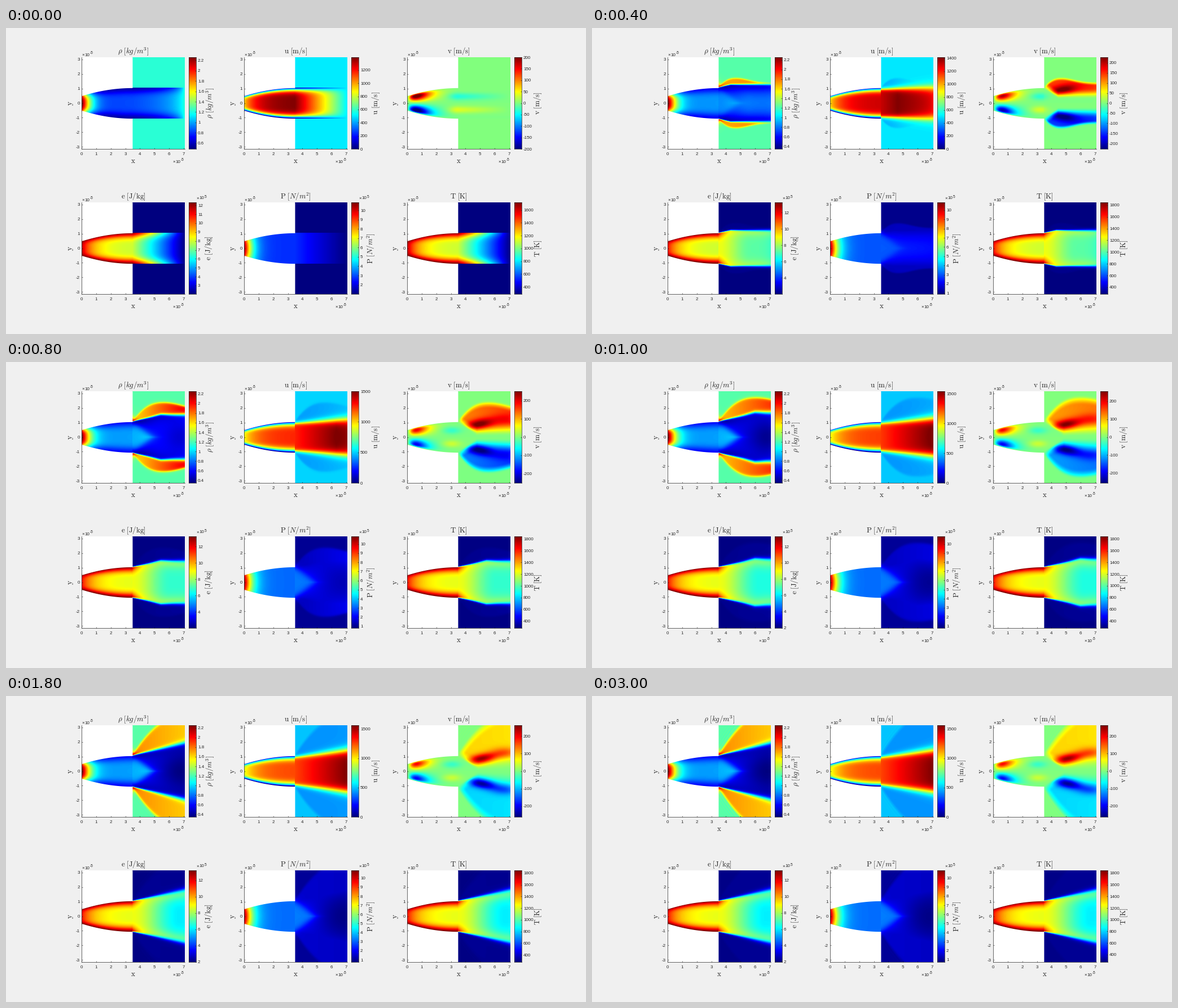
These frames come from a looping animation (1028x544 px, 3200 ms). A matplotlib script:

```python
import numpy as np
import matplotlib.pyplot as plt
from matplotlib.animation import FuncAnimation
from matplotlib.colors import ListedColormap

W, H, DPI = 1028, 544, 64
INK = "#262626"
plt.rcParams["font.family"] = "Liberation Sans"
plt.rcParams["mathtext.fontset"] = "cm"
plt.rcParams["axes.unicode_minus"] = False

ramp = np.linspace(0, 1, 256)
JET = ListedColormap(np.clip(1.5 - abs(4 * ramp[:, None] - [3, 2, 1]), 0, 1))

# Lengths in 1e-5 m, pressure in 1e5 Pa
XMAX, YMAX, EXIT, LIP = 7.08, 3.15, 3.48, 1.05
T_AIR, U_AIR, RHO_AIR, R = 288.0, 500.0, 1.225, 287e-5
P_AIR = RHO_AIR * R * T_AIR
NX, NY = 183, 163
X, Y = np.meshgrid((np.arange(NX) + 0.5) / NX * XMAX,
                   ((np.arange(NY) + 0.5) / NY * 2 - 1) * YMAX)
A = abs(Y)                          # distance from the axis
D = np.clip(X - EXIT, 0, None)      # distance behind the nozzle
FAR = D / (XMAX - EXIT)
PLUME = X > EXIT


# ---------------------------------------------------------------- helpers
def wall(x):
    return 0.5 + 0.55 * (1 - (1 - np.minimum(x, EXIT) / EXIT) ** 2)


def sigmoid(z):
    return 1 / (1 + np.exp(-np.clip(z, -40, 40)))


def smoothstep(z):
    z = np.clip(z, 0, 1)
    return z * z * (3 - 2 * z)


def gauss(dx, dy=0):
    return np.exp(-dx ** 2 - dy ** 2)


def rim(s):
    """0 on the axis, 1 at the hot edge."""
    return 1 - (1 - s ** 4) ** 1.5


SOLID = ~PLUME & (A > wall(X) + 0.08)


# ---------------------------------------------------------------- flow
def nozzle(k):
    settle = min(k / 3, 1)
    x = np.minimum(X, EXIT)
    s = np.minimum(A / wall(x), 1)

    t_end = 1105 + 110 * settle
    t = t_end + (1640 - t_end) * np.exp(-x / 0.85)
    t = t + (1847 - 135 * np.exp(-3 * k) - t) * rim(s)

    p_end = 2.68 + 0.42 * settle
    p = p_end + (10.8 - p_end) * np.exp(-((x + 0.1 * s ** 2) / 0.58) ** 1.2)

    u_end = 1400 - 135 * settle
    u = (u_end - (u_end - 930) * np.exp(-x / 0.9)) * (1 - s ** 5)

    q = x / 0.65
    v = (222 - 27 * settle) * (q * np.exp(1 - q)) ** (1.6 + 0.4 * settle)
    v = v * s ** 1.2 * (1 - s ** 5) / 0.54 - dip(x, settle)
    return t, p, u, v


def dip(x, settle):
    """Weak inward flow near the nozzle exit."""
    return 39 * gauss((x - EXIT + 0.43 * settle) / 0.65, (A - 0.46) / 0.25)


def start_plume(fields):
    """Exit profile blended linearly into still surroundings."""
    air = (T_AIR, P_AIR, U_AIR, 0)
    return [np.where(A < LIP, a + (b - a) * FAR, b)
            for a, b in zip(fields, air)]


def front_height(k):
    """Edge of the expanding pressure wave: an arc that grows steadily."""
    n = min(k, 11) - 1
    q = D / (0.75 + 0.45 * n)
    rise = 1 - np.clip(1 - q, 0, 1) ** 2.4
    fall = 0.5 + 0.5 * gauss(q - 1)
    return LIP + (0.33 + 0.33 * n) * np.where(q < 1, rise, fall)


def plume(k):
    n = k - 1
    a = min(n / 6, 1)                        # progress to the steady jet
    surge = 0.55 * gauss((k - 4) / 1.6) - 0.12 * a
    head = sigmoid((3.1 + 1.5 * n - D) / 0.4)

    # compressed air behind the front, with faint ripples ahead of it
    front = front_height(k)
    d = A - front
    shock = sigmoid(-d / (0.025 + 0.045 * a))
    waves = 0.1 * np.clip((k - 5) / 10, 0, 1)
    shock = shock + np.where(
        d > 0, waves * np.sin(2 * np.pi * d / 0.28) * np.exp(-d / 0.6), 0)
    rho_out = 1.72 + surge * (FAR - 0.3)
    t_out = T_AIR + 40 * (rho_out - RHO_AIR) * shock
    p_out = R * (RHO_AIR + (rho_out - RHO_AIR) * shock) * t_out

    # hot jet inside the contact line
    reach = 0.3 + 0.55 * n
    edge = LIP + 0.21 * np.minimum(D, reach) + 0.08 * a * gauss(
        (D - reach) / 0.6)
    r = np.minimum(A / edge, 1)
    mid = 0.61 - (0.12 + 0.13 * a) * smoothstep(D / (2 + 1.2 * a))
    hot = 0.56 + 0.4 * np.exp(-D / 0.5)
    t_jet = 285 + 1553 * head * (mid + (hot - mid) * rim(r))
    soft = 0.015 + (0.008 + 0.018 * a) * D
    t = t_out + (t_jet - t_out) * sigmoid((edge - A) / soft)

    # pressure: bright wedge at the exit, then over-expansion
    low = 2.1 + 0.6 * (1 - a) ** 3
    low = low - 1.25 * smoothstep(n / 5) * smoothstep(D / 3.3)
    low = P_AIR + (low - P_AIR) * head
    p = low + (p_out - low) * r ** 2
    wedge = sigmoid((1 - D / 1.35 - A / LIP) / 0.15)
    p = p + (2.75 + 0.5 * min(n / 2, 1) - p) * wedge

    span = min(0.3 + 0.85 * n, 3.5)
    u_mid = 1400 - 135 * min(k / 3, 1) + 85 * np.minimum(D, span)
    u_mid = u_mid - 40 * np.clip(D - span, 0, None)
    u_mid = U_AIR + (u_mid - U_AIR) * head
    u_out = U_AIR - 78 * shock * np.exp(-(D / (0.3 + 0.85 * n)) ** 2 / 2)
    y_mid = 0.95 + (0.01 + 0.12 * a) * D
    u = u_out + (u_mid - u_out) * sigmoid((y_mid - A) / (0.06 + 0.03 * D))

    # outward flow: broad fan plus a strong lobe beside the jet
    start = np.maximum(0.5 * (1 - a) ** 3, 0.95 * (1 - D / 1.4))
    fan = (88 + 62 * (1 - a) + 80 * surge * FAR) * head
    fan = fan * smoothstep((A - start) / (0.6 + 0.25 * a * D))
    fan = fan * (0.55 + 0.45 * smoothstep((front - A) / (0.1 + 0.6 * a)))
    dx = X - 4.7 - 0.4 * a
    lobe = (80 + 90 * a) * gauss(dx, (A - 0.92 + 0.08 * a - 0.18 * dx) / 0.34)
    lobe = lobe + 70 * a * gauss((X - 6.7) / 0.9, (A - 1.25) / 0.38)
    v = (fan + lobe * smoothstep((A - start) / 0.35)) * shock
    return t, p, u, v - dip(X, 1)


def flow(k):
    inside = nozzle(k)
    outside = start_plume(inside) if k == 0 else plume(k)
    t, p, u, v = (np.where(SOLID, np.nan, np.where(PLUME, b, a))
                  for a, b in zip(inside, outside))
    return [p / (R * t), u, v * np.sign(Y), t * 717e-5, p, t]


def scales(k):
    """Low, high and tick step of each colour bar."""
    n = max(k - 1, 0)
    u = 1397 + 170 * smoothstep(n / 5.2)
    v = 200 + 62 * (1 - np.exp(-n / 1.75))
    t0 = 286 - 2 * min(n, 4) - 0.5 * max(k - 5, 0)
    t1 = 1847 - 127 * np.exp(-3.2 * k)
    return [(0.345 + 0.145 * np.exp(-2.2 * k), 2.256, 0.2),
            (0, u, 200 if u < 1500 else 500),
            (-v, v, 50 if v < 250 else 100),
            (t0 * 717e-5, t1 * 717e-5, 1 if t1 < 1800 else 2),
            (0.75 + 0.26 * np.exp(-n / 1.7), 10.85, 1),
            (t0, t1, 200)]


# ---------------------------------------------------------------- figure
fig = plt.figure(figsize=(W / DPI, H / DPI), dpi=DPI, facecolor="#f0f0f0")


def pt(px):
    return px * 72 / DPI


def box(x0, y0, x1, y1):
    return fig.add_axes([x0 / W, 1 - y1 / H, (x1 - x0) / W, (y1 - y0) / H])


def text(px, py, s, size=13, **kw):
    fig.text(px / W, 1 - py / H, s, fontsize=pt(size), color=INK, **kw)


def power(px, py, e):
    text(px, py, "×", 8, va="center")
    text(px + 5.5, py, "10", 8, va="center")
    text(px + 15, py - 3, str(e), 6.5, va="center")


def style_ticks(ax):
    ax.tick_params(direction="in", length=pt(2), width=pt(0.6), pad=pt(3),
                   labelsize=pt(8), color=INK, labelcolor=INK)
    for sp in ax.spines.values():
        sp.set_linewidth(pt(0.7))
        sp.set_color(INK)


def panel(left, top, title, label_x):
    right, bottom = left + NX, top + NY
    ax = box(left, top, right, bottom)
    img = ax.imshow(np.zeros((NY, NX)), cmap=JET, origin="lower",
                    aspect="auto", interpolation="nearest",
                    extent=(0, XMAX, -YMAX, YMAX), vmin=0, vmax=1)
    xs = np.linspace(0, EXIT, 80)
    for sgn in (1, -1):
        ax.fill_between(xs, sgn * wall(xs), sgn * YMAX, color="white",
                        linewidth=0, zorder=1.5)
    ax.set_xlim(0, XMAX)
    ax.set_ylim(-YMAX, YMAX)
    ax.set_xticks(range(8))
    ax.set_yticks(range(-3, 4))
    style_ticks(ax)
    ax.tick_params(axis="x", pad=pt(5.5))
    ax.spines[["top", "right"]].set_visible(False)

    bar = box(round(left + 190.4), top, round(left + 203.2), bottom)
    bar.imshow(ramp[:, None], cmap=JET, origin="lower", aspect="auto",
               extent=(0, 1, 0, 1))
    bar.set_xticks([])
    bar.yaxis.tick_right()
    style_ticks(bar)

    cx, cy = (left + right) / 2, (top + bottom) / 2
    turned = dict(ha="center", va="center", rotation=90)
    text(cx, top - 7, title, ha="center", va="baseline")
    text(cx, bottom + 25.5, r"$\mathrm{x}$", ha="center", va="baseline")
    text(left - 19, cy, r"$\mathrm{y}$", **turned)
    text(label_x, cy, title, **turned)
    power(left, top - 4, -5)
    power(right - 22, bottom + 23, -5)
    return img, bar


LEFTS, TOPS = (134, 422, 711), (52, 310)
LABELS = [(r"$\rho\ [kg/m^3]$", 361.5), (r"$\mathrm{u\ [m/s]}$", 656),
          (r"$\mathrm{v\ [m/s]}$", 943), (r"$\mathrm{e\ [J/kg]}$", 360),
          (r"$\mathrm{P}\ [N/m^2]$", 647), (r"$\mathrm{T\ [K]}$", 943)]
panels = [panel(LEFTS[i % 3], TOPS[i // 3], *LABELS[i]) for i in range(6)]
power(337, 303, 5)
power(625, 303, 5)


def draw(k):
    for (img, bar), field, (lo, hi, step) in zip(panels, flow(k), scales(k)):
        img.set_data((field - lo) / (hi - lo))
        first = int(np.ceil(lo / step - 1e-6))
        last = int(np.floor(hi / step + 1e-6))
        ticks = [n * step for n in range(first, last + 1)]
        bar.set_yticks([(v - lo) / (hi - lo) for v in ticks],
                       [f"{v:g}" for v in ticks])
        bar.set_ylim(0, 1)
    return []


anim = FuncAnimation(fig, draw, frames=16, interval=200, repeat=True)
plt.show()
```
